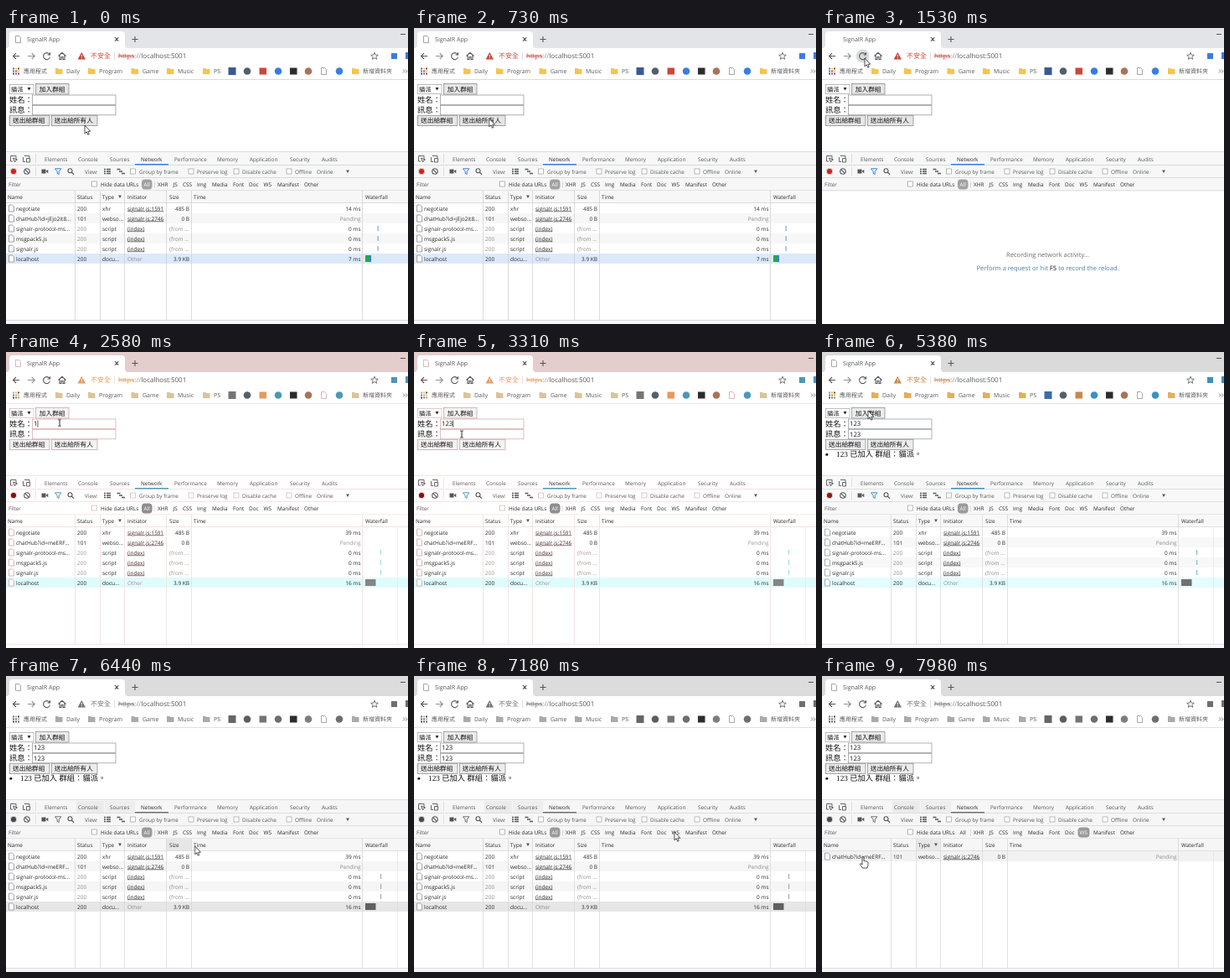
An HTML page that plays this animation: 480 px wide and 353 px high, repeating every 8 s.

```html
<!DOCTYPE html>
<html>
<head>
<meta charset="utf-8">
<title>SignalR App</title>
<style>
html, body { margin: 0; width: 100%; height: 100%; overflow: hidden; background: #fff; }
svg { display: block; }
#stage {
  width: 480px; height: 353px;
  font: 6.4px 'Open Sans', 'Noto Sans', 'Noto Sans CJK TC', 'Noto Sans CJK JP', sans-serif;
  text-rendering: geometricPrecision; fill: var(--ink);
  animation: tint 8s step-end infinite;
}
.ui { font-size: 7px; fill: var(--tool); }
.tool { fill: var(--tool); }
.row { font-size: 6.5px; }
.ctl { font-size: 7.7px; fill: #111; }
.page { font: 9.3px 'Liberation Serif', 'Noto Sans CJK TC', 'Noto Sans CJK JP', serif; fill: #111; }
.url { font-size: 8px; }
.hint { font-size: 7.6px; text-anchor: middle; }
.end { text-anchor: end; }
.dim { fill: var(--dim); }
.link { text-decoration: underline; fill: var(--link); }
.icon { fill: none; stroke: var(--tool); stroke-width: 1.1; }
.box { fill: #fff; stroke: var(--ctl); stroke-width: .6; }
.btn { fill: var(--btn); stroke: var(--ctl); stroke-width: .8; }
.field { fill: #fff; stroke: var(--ctl); stroke-width: .7; }
.rule { stroke: var(--line); stroke-width: .8; }
.pane { fill: var(--pane); }
.pill { fill: var(--pill); }
.strip { fill: var(--strip); }
.red { fill: var(--red); }
.gold { fill: var(--folder); }
.blue { fill: var(--blue); }

@keyframes tint {
  0% { --strip: #e2e4e7; --red: #d0453a; --folder: #f4c64c; --blue: #3b7de0; --navy: #3b5998; --line: #d2d2d2;
       --sel: #dce9fb; --bar: #27a556; --tick: #7aa5f0; --rec: #d8201c; --ctl: #8c8c8c; --btn: #e6e6e6;
       --ink: #2a2a2a; --tool: #55585c; --dim: #8c8c8c; --link: #2a2a2a; --pane: #f7f7f7; --pill: #a2a2a2; }
  32.25% { --strip: #e4cecd; --red: #e59a5c; --folder: #dcc39a; --blue: #4c98b4; --navy: #757575; --line: #f2dcdc;
       --sel: #dffcfc; --bar: #858585; --tick: #9fe0e0; --rec: #7c1414; --ctl: #d0a4a4; --btn: #f6f4f4;
       --ink: #2c2626; --tool: #5e5254; --dim: #a89090; --link: #4a2c30; --pane: #fff; --pill: #8e8e8e; }
  43.625% { --strip: #dcfbfe; --red: #ee9a30; --folder: #f4c860; --blue: #1c86d0; --navy: #1c70c0; --line: #e0f2f6;
       --sel: #e2fbff; --bar: #1080d0; --tick: #7cb8d8; --rec: #7a1c08; --ctl: #58aad4; --btn: #f2fcff;
       --ink: #20303e; --tool: #2a6c9c; --dim: #86bcd8; --link: #3c4c5c; --pane: #fff; --pill: #5aa6dc; }
  65% { --strip: #dadada; --red: #c6884c; --folder: #e6b04c; --blue: #3a90c4; --navy: #3a6da4; --line: #dadada;
       --sel: #e3fcff; --bar: #707070; --tick: #86b8cc; --rec: #8a1c14; --ctl: #8a979c; --btn: #ececec;
       --ink: #2a2a2a; --tool: #55585c; --dim: #8c8c8c; --link: #2a2a2a; --pane: #f8f8f8; --pill: #9a9a9a; }
  73.75%, 100% { --strip: #dcdcdc; --red: #747474; --folder: #aaa; --blue: #6e6e6e; --navy: #666; --line: #d8d8d8;
       --sel: #e6e6e8; --bar: #60606a; --tick: #aaa; --rec: #484848; --ctl: #929292; --btn: #ececec;
       --ink: #2a2a2a; --tool: #555; --dim: #8c8c8c; --link: #2a2a2a; --pane: #f6f6f6; --pill: #9a9a9a;
       filter: grayscale(1); }
}
#cursor { animation: move 8s ease-in-out infinite; }
@keyframes move {
  0%, 7.375% { transform: translate(94px, 116px); }
  15.375%, 20% { transform: translate(51px, 36px); }
  28.4%, 39.5% { transform: translate(64px, 84.5px); }
  41.4%, 56% { transform: translate(57px, 98px); }
  60.4% { transform: translate(55px, 70px); }
  69.6% { transform: translate(55px, 70px); animation-timing-function: ease-in; }
  74.5% { transform: translate(112px, 152px); animation-timing-function: ease-out; }
  79.1% { transform: translate(221px, 205px); animation-timing-function: linear; }
  80.5% { transform: translate(225.5px, 203px); }
  89.8%, 93.1% { transform: translate(311px, 186px); }
  99.6%, 100% { transform: translate(49px, 216px); }
}
</style>
</head>
<body>
<svg id="stage" viewBox="0 0 480 353">
  <defs>
    <path id="doc" d="M.5.5H4.5L6.5 2.5V8.5H.5Z" fill="#fff" stroke="var(--ctl)" stroke-width=".8"/>
    <path id="folder" class="gold" d="M0 1H3.3L4.3 2H8.5V8H0Z"/>
    <path id="down" d="M0 0H4L2 3.4Z"/>
  </defs>
  <rect width="480" height="353" fill="#fff"/>

  <g id="browser">
    <rect class="strip" width="480" height="24"/>
    <path d="M0 24Q4 24 4 20V8Q4 4 8 4H138Q142 4 142 8V20Q142 24 146 24Z" fill="#fff"/>
    <use href="#doc" x="11" y="9" data-on="0 1420 1700 8000"/>
    <text x="25" y="16.3" class="ui" style="font-size:7.1px">SignalR App</text>
    <path class="icon" d="M130 11.2l4.4 4.4M134.4 11.2l-4.4 4.4M150.5 13.5h7M154 10v7M471 7.5h6"/>
    <circle cx="48.5" cy="33.5" r="8" fill="#dadcde" data-on="1180 1660"/>
    <path class="icon" d="M16 33.5H8.500M12 30l-3.500 3.500L12 37"/>
    <path class="icon" opacity=".65" d="M26 33.500h8M30.800 30l3.500 3.500L30.800 37"/>
    <path class="icon" d="M51.800 31.200A4 4 0 1 0 52.500 34.500M52.500 29.300V32H49.600"/>
    <path class="icon" d="M62.500 33.500L67 29.300L71.500 33.500M64 32.500V37.500H66V34.500H68V37.500H70V32.500"/>
    <path class="red" d="M90.300 28.800L95 37.400H85.600Z"/>
    <path d="M90.300 31.800v2.600M90.300 35.300v1" stroke="#fff"/>
    <text class="url red" x="101" y="36.300">不安全</text>
    <path class="rule" d="M129.500 29v9"/>
    <text class="url" x="134" y="36.200"><tspan class="red" text-decoration="line-through">https</tspan><tspan class="dim">://</tspan><tspan class="tool">localhost:5001</tspan></text>
    <path class="icon" style="stroke-width:.8" d="M440 29.200l1.200 2.900 3.100.2-2.400 2 .8 3-2.700-1.700-2.700 1.700.8-3-2.400-2 3.100-.2Z"/>
    <rect class="blue" x="460" y="30" width="7" height="7"/>
    <rect class="blue" x="477" y="29" width="3" height="8"/>
    <g id="apps"></g>
    <g id="folders"></g>
    <rect x="265.500" y="47" width="9" height="9" fill="var(--navy)"/>
    <circle cx="288" cy="51.500" r="4.300" fill="#546068"/>
    <rect class="red" x="302.500" y="47.500" width="8.500" height="8"/>
    <circle class="blue" cx="325" cy="51.500" r="4.300"/>
    <rect x="339" y="47.500" width="8.500" height="8" fill="#2c2c2c"/>
    <circle cx="361" cy="51.500" r="4.300" fill="#a87458"/>
    <use href="#doc" x="376" y="47"/>
    <circle class="blue" cx="398" cy="51.500" r="4.300"/>
    <path class="icon" d="M474 49.500l2 2-2 2M477 49.500l2 2-2 2" style="stroke-width:.8"/>
    <path class="rule" d="M0 61.500H480"/>
  </g>

  <g id="page">
    <rect class="box" x="4.500" y="67.500" width="28.500" height="11"/>
    <text class="ctl" x="6" y="76" style="font-size:7.300px">貓派</text>
    <use href="#down" x="25.500" y="71"/>
    <rect class="btn" x="35.500" y="66.500" width="39.500" height="12.500"/>
    <rect x="35.500" y="66.500" width="39.500" height="12.500" fill="#0002" data-on="5200 5340"/>
    <text class="ctl" x="39.800" y="75.700">加入群組</text>
    <text class="page" x="4" y="89.200">姓名：</text>
    <text class="page" x="4" y="101.400">訊息：</text>
    <rect class="field" x="31.500" y="80" width="99.500" height="11.500"/>
    <rect class="field" x="31.500" y="92.300" width="99.500" height="11.500"/>
    <rect class="btn" x="4.500" y="104.300" width="47.500" height="12.200"/>
    <text class="ctl" x="8" y="113.200">送出給群組</text>
    <rect class="btn" x="54.500" y="104.300" width="54.500" height="12.200"/>
    <text class="ctl" x="57.800" y="113.200">送出給所有人</text>
    <g id="typed" class="ctl"></g>
    <g data-on="5290 8000">
      <circle cx="5.800" cy="122.300" r="1.500" fill="#111"/>
      <text class="page" x="17" y="125.400">123 已加入 群組：貓派。</text>
    </g>
  </g>

  <g id="devtools">
    <rect class="pane" y="147" width="480" height="47"/>
    <rect x="84" y="149" width="33" height="14" fill="#ebebeb" data-on="5930 8000"/>
    <rect x="118" y="149" width="36" height="14" fill="#eee" data-on="5990 8000"/>
    <path class="rule" d="M0 147.500H480M0 163.500H480M0 178.500H480M35.500 150v11M35.500 166v10M177.500 183v8"/>
    <rect class="blue" x="154" y="162" width="40" height="1.400"/>
    <path class="icon" style="stroke-width:.9" d="M12 157V152.500H5.500V159H8M8.500 155l5 2-2 .8-.9 2ZM20.500 154V159.500H23M22 152.500H28V155M24.500 155.500H28.500V160H24.500Z"/>
    <circle cx="9" cy="171" r="3.700" fill="var(--rec)" stroke="var(--line)"/>
    <path class="icon" d="M28.300 171a3.300 3.300 0 1 0-6.600 0a3.300 3.300 0 1 0 6.600 0M22.700 168.700l4.600 4.600"/>
    <path class="tool" d="M42.500 168.500h5v5h-5ZM48 170.500l2.300-1.700v4.400L48 171.500Z"/>
    <path d="M58.500 167.800h7.400l-2.700 3.400v3.200l-2-1v-2.200Z" fill="none" stroke="var(--blue)"/>
    <path class="icon" d="M79 170.200a2.500 2.500 0 1 0-5 0a2.500 2.500 0 1 0 5 0M78.300 172l2.800 2.800"/>
    <path class="icon" style="stroke-width:1.300" d="M117 168.500h2M120 168.500h5M117 171h2M120 171h5M117 173.500h2M120 173.500h5M132.500 168.500h4M135 171h4M138 173.500h4"/>
    <use href="#down" x="406" y="169.500" class="tool"/>
    <g id="checks"></g>
    <rect class="pill" x="162" y="180.500" width="12.500" height="12" rx="4" data-on="0 7450"/>
    <rect class="pill" x="305.500" y="180.500" width="14" height="12" rx="4" data-on="7450 8000"/>
    <g id="labels"></g>
    <path class="rule" d="M0 193.800H480"/>
  </g>

  <g class="hint" data-on="1420 1670">
    <text x="269.500" y="273.300" fill="#6c6c74">Recording network activity...</text>
    <text x="269.500" y="289.300" fill="#527c9c">Perform a request or hit <tspan font-weight="600" fill="#444">F5</tspan> to record the reload.</text>
  </g>

  <g data-on="0 1420 1670 8000">
    <rect class="pane" y="194.300" width="480" height="14"/>
    <rect x="192" y="194.300" width="29.500" height="14" fill="#e6e6e6" data-on="6260 6500"/>
    <rect x="112.500" y="194.300" width="29" height="14" fill="#e8e8e8" data-on="7720 8000"/>
    <g id="header"></g>
    <use href="#down" x="134" y="199.500" class="tool"/>
    <g id="rows" class="row"></g>
    <path class="rule" d="M0 208.500H480M82.500 194V348M112.500 194V348M141.500 194V348M191.500 194V348M221.500 194V348M425.500 194V348"/>
    <path class="rule" d="M467.500 209V348" opacity=".6" data-on="1670 8000"/>
    <rect class="pane" y="348" width="480" height="5"/>
    <path class="rule" d="M0 348.500H480"/>
  </g>

  <g id="cursor">
    <path d="M0 0V9.800L2.200 7.800 3.700 11.200 5.200 10.600 3.800 7.200H6.800Z" fill="#fff" stroke="#222" stroke-width=".8" data-on="0 2150 4700 7890"/>
    <path d="M-1.800-4H-.4L0-3.500.4-4H1.800M0-3.500V3.500M-1.800 4H-.4L0 3.500.4 4H1.800" fill="none" stroke="#111" stroke-width=".9" data-on="2150 4700"/>
    <path d="M-1 0Q0-1.300 1 0V4.500L2.800 4.800 4.600 5.300 6 6.200V9.500L5 13H-.6L-3.200 9.200Q-4 7.600-2.600 7.500L-1 9Z" fill="#fff" stroke="#222" stroke-width=".8" data-on="7890 8000"/>
  </g>
</svg>
<script>
const LOOP = 8000;
const $ = id => document.getElementById(id);
const put = (id, markup) => $(id).insertAdjacentHTML('beforeend', markup);
const text = (x, y, s, cls = '', on = '') =>
  `<text x="${x}" y="${y}" class="${cls}" ${on && `data-on="${on}"`}>${s}</text>`;
const line = (id, y, cls, words) => {
  for (const [x, s] of Object.entries(words)) put(id, text(x, y, s, cls));
};

// bookmarks
const dots = ['--red', '--folder', '--tool', '--blue'];
for (let i = 0; i < 9; i++)
  put('apps', `<rect x="${8 + i % 3 * 3}" y="${47.5 + Math.floor(i / 3) * 3}" width="2" height="2" fill="var(${dots[i % 4]})"/>`);
for (const x of [59, 98, 149.5, 192, 235, 413])
  put('folders', `<use href="#folder" x="${x}" y="47"/>`);
line('folders', 54, 'ui', { 21: '應用程式', 72: 'Daily', 111: 'Program', 163: 'Game', 205: 'Music', 248: 'PS', 426: '新增資料夾' });

// developer tools bars
line('labels', 158.5, 'tool', { 46: 'Elements', 86: 'Console', 124: 'Sources', 201: 'Performance', 252: 'Memory',
  291: 'Application', 339: 'Security', 377: 'Audits' });
line('labels', 158.5, '', { 161: 'Network' });
line('labels', 173.5, 'tool', { 94: 'View:', 159: 'Group by frame', 228: 'Preserve log', 282: 'Disable cache',
  345: 'Offline', 371: 'Online' });
line('labels', 188.8, 'tool', { 3: 'Filter' });
line('labels', 188.8, '', { 113: 'Hide data URLs', 181: 'XHR', 199.5: 'JS', 211: 'CSS', 228: 'Img', 246: 'Media',
  271: 'Font', 290: 'Doc', 324: 'Manifest', 356: 'Other' });
for (const [x, s, on, off] of [[164.5, 'All', '0 7450', '7450 8000'], [307.5, 'WS', '7450 8000', '0 7450']])
  put('labels', `<g fill="#fff">${text(x, 188.8, s, '', on)}</g>` + text(x, 188.8, s, '', off));
for (const [x, y] of [[148.5, 168], [218, 168], [272, 168], [335, 168], [102.5, 183]])
  put('checks', `<rect class="box" x="${x}" y="${y}" width="6" height="6"/>`);

// request table
line('header', 203.8, '', { 2: 'Name', 85: 'Status', 115: 'Type', 145: 'Initiator', 195: 'Size', 224: 'Time', 429: 'Waterfall' });

function row(i, [name, status, type, from, size, time], on, back = i % 2 ? 'var(--pane)' : '#fff') {
  const top = 209 + i * 12, y = top + 8.5;
  const cached = size.startsWith('(');
  const either = (v, x, cls) => Array.isArray(v)
    ? text(x, y, v[0], cls, '0 1420') + text(x, y, v[1], cls, '1420 8000')
    : text(x, y, v, cls);
  put('rows', `<g data-on="${on}"><rect y="${top}" width="480" height="12" fill="${back}"/>
    <use href="#doc" x="3" y="${top + 1.5}"/>` +
    either(name, 12, '') + text(85, y, status, cached ? 'dim' : '') + text(115, y, type) +
    text(145, y, from, from === 'Other' ? 'dim' : 'link') +
    (cached ? text(195, y, size, 'dim') : text(219, y, size, 'end')) +
    either(time, 423.5, time === 'Pending' ? 'end dim' : 'end') +
    (cached ? [[443.5, '0 1420'], [447, '1420 8000']].map(([x, w]) =>
      `<rect x="${x}" y="${top + 3}" width="1.200" height="6" fill="var(--tick)" data-on="${w}"/>`).join('') : '') + '</g>');
}
const all = '0 7450';
const socket = [['chatHub?id=jEjo2it8...', 'chatHub?id=meERF...'], 101, 'webso...', 'signalr.js:2746', '0 B', 'Pending'];
row(0, ['negotiate', 200, 'xhr', 'signalr.js:1591', '485 B', ['14 ms', '39 ms']], all);
row(1, socket, all);
['signalr-protocol-ms...', 'msgpack5.js', 'signalr.js'].forEach((name, i) =>
  row(i + 2, [name, 200, 'script', '(index)', '(from ...', '0 ms'], all));
row(5, ['localhost', 200, 'docu...', 'Other', '3.9 KB', ['7 ms', '16 ms']], all, 'var(--sel)');
row(0, socket, '7450 8000', '#f2f2f2');
put('rows', `<g data-on="0 1420"><rect x="429" y="271" width="5" height="8" fill="var(--bar)"/>
  <rect class="blue" x="434" y="271" width="2" height="8"/></g>
  <rect x="429" y="271" width="12.500" height="8" fill="var(--bar)" data-on="1420 7450"/>`);

// typing: focus time, key times, blur time
function type(y, focus, keys, blur) {
  const x = n => 33 + n * 4.4;
  const marks = [focus, ...keys];
  keys.forEach((t, n) => put('typed', text(x(n), y, n + 1, '', `${t} ${LOOP}`)));
  marks.forEach((t, n) => {
    const end = marks[n + 1] || blur;
    const on = end - t > 500 ? `${t} ${t + 200} ${t + 380} ${end}` : `${t} ${end}`;
    put('typed', `<rect x="${x(n) + .2}" y="${y - 6.8}" width=".7" height="8.200" data-on="${on}"/>`);
  });
}
type(88.3, 2270, [2580, 2820, 3160], 3490);
type(100.6, 3490, [3610, 3740, 3920], 4830);

// data-on lists the moments at which a part turns on, off, on ...
for (const el of document.querySelectorAll('[data-on]')) {
  const base = +(el.getAttribute('opacity') || 1);
  const times = el.dataset.on.split(' ').map(Number);
  const steps = times.map((t, i) => ({ offset: t / LOOP, opacity: i % 2 ? 0 : base, easing: 'step-end' }));
  if (times[0] > 0) steps.unshift({ offset: 0, opacity: 0, easing: 'step-end' });
  if (times[times.length - 1] < LOOP) steps.push({ offset: 1, opacity: 0 });
  el.animate(steps, { duration: LOOP, iterations: Infinity });
}
const start = document.timeline.currentTime || 0;
for (const a of document.getAnimations()) a.startTime = start;
</script>
</body>
</html>
```
